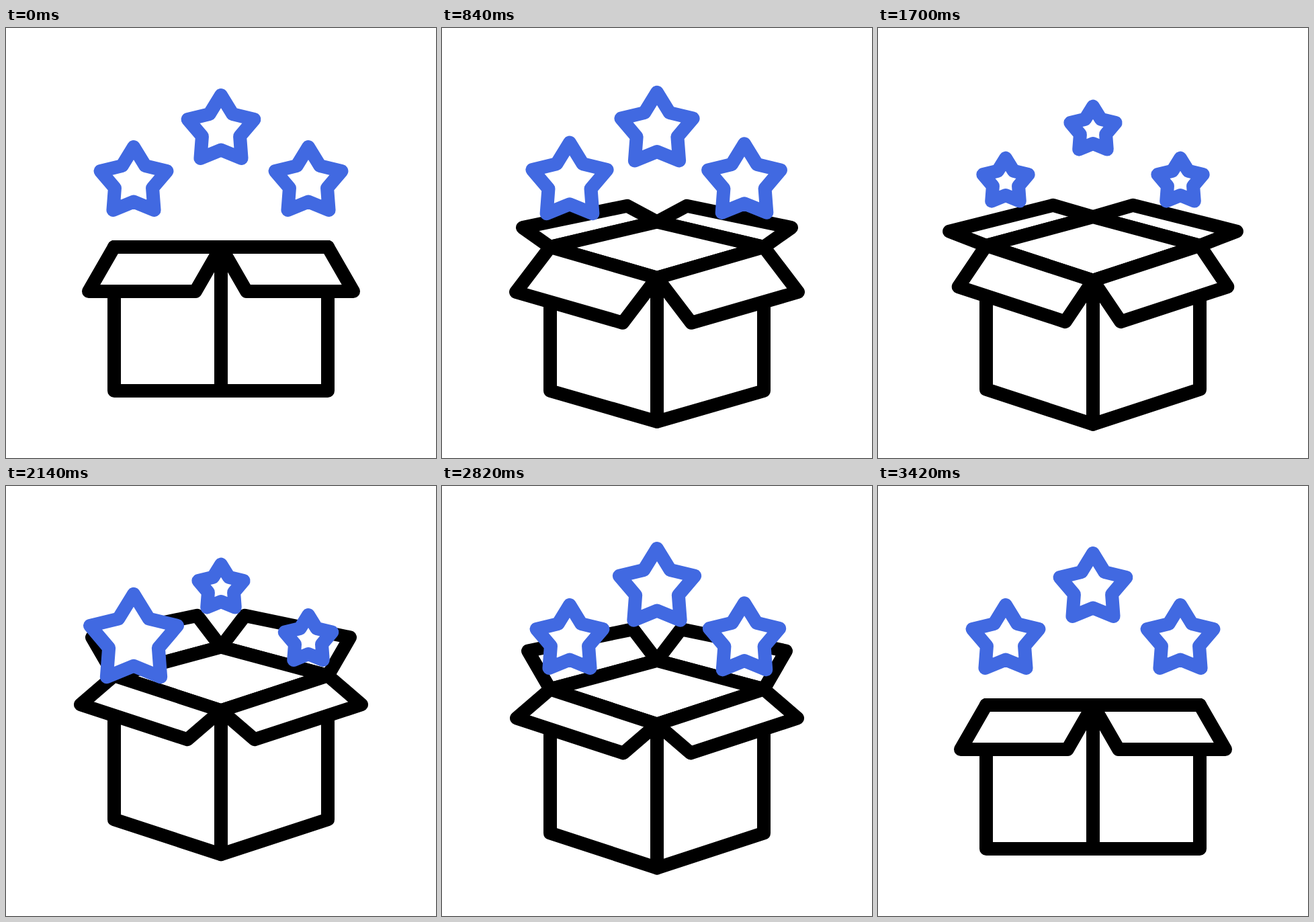
An HTML page for the animation above (3600 ms loop, 640 px wide and 640 px high).

```html
<!DOCTYPE html>
<html lang="en">
<head>
<meta charset="utf-8">
<title>Box with stars</title>
<style>
  html, body { margin: 0; width: 100%; height: 100%; overflow: hidden; background: #fff; }
  svg { display: block; width: 100vw; height: 100vh; }
  path { fill: #fff; stroke: #000; stroke-width: 20; stroke-linejoin: round; stroke-linecap: round; }
  .star { stroke: #4169e1; }
</style>
</head>
<body>
<svg id="stage" viewBox="0 0 640 640"></svg>
<script>
const LOOP = 3600, STEP = 20, OPEN = 220, END = 3420;
const MID = 320, HALF = 159, RIM = 326, WALL = 214;
const DEPTH = 52, JUMP = 44, BACK = .82;
const SMALL = .68;

const mix = (a, b, k) => a + (b - a) * k;

// Smooth 0 to 1 between two times.
function ease(t, from, to) {
  const k = Math.min(1, Math.max(0, (t - from) / (to - from)));
  return (1 - Math.cos(Math.PI * k)) / 2;
}

const hop = (t, start, top, end) => JUMP * ease(t, start, top) * (1 - ease(t, top, end));
const lift = t => hop(t, 980, 1390, 1752) + hop(t, 1752, 2120, 2530) + hop(t, 2640, 2985, END);
const depth = t => DEPTH * ease(t, OPEN, 1020) * (1 - ease(t, 2930, END));

// Offsets of the flaps' outer edges from the rim.
const closed = { front: [-38, 66], back: [0, 0] };
const spread = { front: [-51, 67], back: [-41, -29] };
const raised = { front: [-50, 43], back: [-33, -57] };
const droop = { front: [-40, 64], back: [-58, -16] };
const swings = [
  [OPEN, 840, spread], [840, 1400, raised], [1400, 1790, droop],
  [1790, 2140, raised], [2900, END, closed]
];
function flap(t, name) {
  return swings.reduce((p, [from, to, pose]) => {
    const k = ease(t, from, to);
    return p.map((v, i) => mix(v, pose[name][i], k));
  }, closed[name]);
}

// Shrink, first pulse together, second pulse from each star's own wake time.
function starSize(t, { peak, wake }) {
  let s = mix(1, SMALL, ease(t, OPEN, 540));
  s = mix(s, peak, ease(t, 620, 975));
  s = mix(s, SMALL, ease(t, 975, 1445));
  s = mix(s, peak, ease(t, wake, wake + 400));
  return mix(s, 1, ease(t, wake + 400, wake + 880));
}
const stars = [
  { x: 190, y: 229, peak: 1.33, wake: 1780 },
  { x: 450, y: 229, peak: 1.28, wake: 2080 },
  { x: 320, y: 152, peak: 1.27, wake: 2180 }
];

const stage = document.getElementById("stage");
function addPath(cls = "") {
  const p = document.createElementNS("http://www.w3.org/2000/svg", "path");
  p.setAttribute("class", cls);
  return stage.appendChild(p);
}
const sides = [1, -1];
const backs = sides.map(() => addPath());
const body = addPath(), lid = addPath(), seam = addPath();
const fronts = sides.map(() => addPath());
stars.forEach(s => s.path = addPath("star"));

const draw = (path, points) =>
  path.setAttribute("d", "M" + points.map(p => p.map(v => v.toFixed(2)).join()).join("L") + "Z");
const mirror = (points, side) => points.map(([x, y]) => [MID + (x - MID) * side, y]);

function starPoints({ x, y }, size) {
  return Array.from({ length: 10 }, (_, i) => {
    const r = (i % 2 ? 29.5 : 52) * size, a = (i / 5 - .5) * Math.PI;
    return [x + r * Math.cos(a), y + r * Math.sin(a)];
  });
}

function render(t) {
  const y = RIM - lift(t), d = depth(t);
  const left = [MID - HALF, y], right = [MID + HALF, y];
  const front = [MID, y + d], back = [MID, y - d * BACK];
  const down = ([px, py]) => [px, py + WALL];
  const [fx, fy] = flap(t, "front"), [bx, by] = flap(t, "back");

  draw(body, [left, front, right, down(right), down(front), down(left)]);
  draw(lid, [left, back, right, front]);
  draw(seam, [front, down(front)]);
  sides.forEach((side, i) => {
    draw(backs[i], mirror([left, [left[0] + bx, y + by],
      [MID + bx * 1.08, back[1] + by * BACK], back], side));
    draw(fronts[i], mirror([left, front, [MID + fx, front[1] + fy],
      [left[0] + fx, y + fy]], side));
  });
  stars.forEach(s => draw(s.path, starPoints(s, starSize(t, s))));
}

const start = performance.now();
function tick() {
  const t = (performance.now() - start) % LOOP;
  render(Math.floor(t / STEP) * STEP);
  requestAnimationFrame(tick);
}
tick();
</script>
</body>
</html>
```
